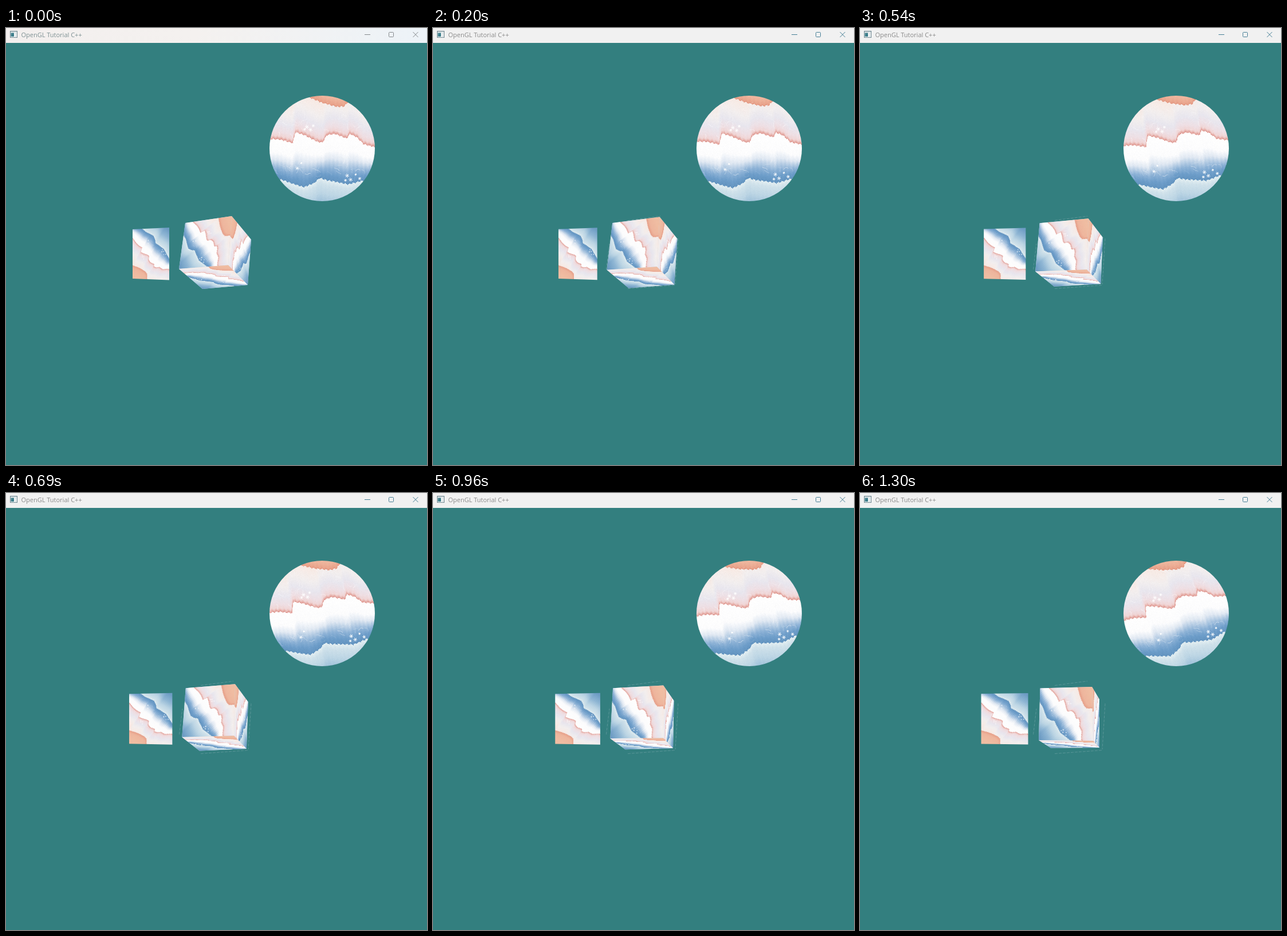
Recreate the animation shown at these times as an HTML page with a canvas. Size 735 by 762 pixels, loop 1360 ms.

```html
<!DOCTYPE html>
<html lang="en">
<head>
<meta charset="utf-8">
<title>OpenGL Tutorial C++</title>
<style>
  html, body { margin: 0; width: 100%; height: 100%; overflow: hidden; background: #337f7f; }
  #stage { position: relative; width: 735px; height: 762px; overflow: hidden; background: #337f7f; }
  svg { position: absolute; left: 0; top: 0; }
  .face { position: absolute; left: 0; top: 0; transform-origin: 0 0; }
  #disc { position: absolute; left: 460px; top: 118px; width: 184px; height: 184px; border-radius: 50%; overflow: hidden; }
  #disc canvas { position: absolute; left: -10.5px; top: -10.5px; width: 205px; height: 205px; }
  #bar { --ink: #467f96; --label: #8a8a8a; }
  #bar.start { --ink: #85898c; --label: #7d9093; }
  #bar text { font: 11px "Open Sans", "Noto Sans", sans-serif; fill: var(--label); }
  #buttons { fill: none; stroke: var(--ink); }
</style>
</head>
<body>
<div id="stage">
  <svg width="735" height="762">
    <defs>
      <linearGradient id="tint">
        <stop offset="0" stop-color="#f3efee"/>
        <stop offset=".45" stop-color="#f4f1ef"/>
        <stop offset="1" stop-color="#edf3f8"/>
      </linearGradient>
    </defs>
    <g id="bar">
      <rect id="barFill" width="735" height="26" fill="#f1f1f1"/>
      <rect x="7.5" y="5.5" width="12" height="11" fill="#f8fafa" stroke="#6f8790"/>
      <path d="M8 7h11" stroke="#a9b9bf"/>
      <rect x="8.5" y="8.5" width="5.500" height="6.500" fill="#3f7f8c"/>
      <path d="M15.500 9.500h3M15.500 12h3M15.500 14.500h3" stroke="#c3ced2"/>
      <text x="26.500" y="15.500">OpenGL Tutorial C++</text>
      <g id="buttons">
        <path d="M626 11.500h10"/>
        <rect x="668.500" y="7.500" width="8" height="8" rx="1"/>
        <path d="M710.500 7l9 9M719.500 7l-9 9"/>
      </g>
    </g>
    <path id="trail" d="M340 335.500L397 328M302.500 421L308 376M428 367L423 447M340 454.500L423 448.500"
          fill="none" stroke="#8fb3b8" stroke-opacity=".5" stroke-width=".8" stroke-dasharray="5 2"/>
    <polygon id="hull" fill="#c9d5e0"/>
  </svg>
  <div id="disc"></div>
</div>
<script>
const $ = id => document.getElementById(id);
const SIDE = 410, SPAN = 205, TILT = 50 * Math.PI / 180;
const LOOP = 1360, LAST = 1300, SPIN = 0.315;
const STARTS = [0, 70, 140, 200, 270, 340, 410, 470, 540, 620,
  690, 760, 830, 890, 960, 1030, 1100, 1160, 1230, 1300];

// Strata boundaries, in units around the texture centre
const RUST = [[-145, -160], [-60, -108], [-22, -89], [0, -80], [25, -73], [38, -74], [46, -83], [55, -95], [70, -150], [145, -170]];
const CREST = [[-145, -18], [-121, -14], [-92, -17], [-74, -16], [-52, -10], [-47, -29], [-32, -24], [-8, -12], [0, -11],
  [8, -24], [22, -26], [42, -18], [48, -26], [60, -20], [72, -8], [91, -3], [113, 18], [145, 30]];
const SHORE = [[-145, 30], [-97, 50], [-77, 52], [-52, 61], [-32, 67], [-15, 60], [-5, 51], [8, 55], [45, 62], [70, 56], [92, 51], [145, 60]];

const ramp = stops => stops.map(([at, hex]) =>
  [at, ...[16, 8, 0].map(s => parseInt(hex, 16) >> s & 255)]);
const RUST_RAMP = ramp([[0, 'e2957f'], [3, 'e9a48c'], [12, 'eeb59d'], [40, 'f0bda2']]);
const SKY_RAMP = ramp([[0, 'dd938c'], [2, 'e5aaa3'], [6, 'f0d5d5'], [14, 'eedfe4'], [28, 'e8e6ee'],
  [45, 'f2eeee'], [65, 'f7ebe6'], [90, 'f7e4dc']]);
const SNOW_RAMP = ramp([[0, 'ffffff'], [.35, 'fcfcfd'], [.52, 'e0e8f2'], [.74, '8db2d6'], [.88, '6d9dc9'], [1, '6293bf']]);
const SEA_RAMP = ramp([[0, 'e4eff2'], [8, 'cfe1ea'], [25, 'bcd5e4'], [50, '8fb6d4'], [80, '6d9cc4']]);

const mix = (a, b, k) => a + (b - a) * k;

// Piecewise linear lookup; returns every column after the first
function sample(rows, x) {
  let i = 1;
  while (i < rows.length - 1 && rows[i][0] < x) i++;
  const a = rows[i - 1], b = rows[i];
  const k = Math.min(1, Math.max(0, (x - a[0]) / (b[0] - a[0])));
  return a.slice(1).map((v, j) => mix(v, b[j + 1], k));
}

function shade(x, y) {
  const rough = 0.9 * Math.sin(x * 0.9) + 0.6 * Math.sin(x * 2.3 + 1);
  const rust = sample(RUST, x)[0] + rough;
  const crest = sample(CREST, x)[0] + rough;
  const shore = sample(SHORE, x)[0] + rough;
  if (y < rust) return sample(RUST_RAMP, rust - y);
  if (y < crest) return sample(SKY_RAMP, crest - y);
  if (y < shore) return sample(SNOW_RAMP, (y - crest) / (shore - crest));
  return sample(SEA_RAMP, y - shore);
}

function randomizer(seed) {
  return () => (seed = (seed * 16807) % 2147483647) / 2147483647;
}

function makeCanvas(size) {
  const c = document.createElement('canvas');
  c.width = c.height = size;
  return c;
}

function paintTexture() {
  const tex = makeCanvas(SIDE), g = tex.getContext('2d');
  const img = g.createImageData(SIDE, SIDE);
  const rnd = randomizer(71), cos = Math.cos(TILT), sin = Math.sin(TILT), unit = SPAN / SIDE;
  for (let j = 0, n = 0; j < SIDE; j++) {
    for (let i = 0; i < SIDE; i++) {
      const x = (i + 0.5) * unit - SPAN / 2, y = (j + 0.5) * unit - SPAN / 2;
      const grain = (rnd() - 0.5) * 8;
      for (const v of shade(x * cos + y * sin, y * cos - x * sin)) img.data[n++] = v + grain;
      img.data[n++] = 255;
    }
  }
  g.putImageData(img, 0, 0);

  g.translate(SIDE / 2, SIDE / 2);
  g.scale(1 / unit, 1 / unit);
  g.rotate(TILT);
  g.strokeStyle = '#fff';
  g.lineCap = 'round';
  // Fine white veins
  for (let i = 0; i < 210; i++) {
    let x = mix(-120, 120, rnd()), y = mix(-78, 48, rnd()), dir = rnd() * 6.28;
    g.globalAlpha = mix(0.12, 0.5, rnd());
    g.lineWidth = mix(0.4, 0.9, rnd());
    g.beginPath();
    g.moveTo(x, y);
    for (let k = 0; k < 4; k++) {
      dir += rnd() * 1.6 - 0.8;
      g.lineTo(x += 2.5 * Math.cos(dir), y += 2.5 * Math.sin(dir));
    }
    g.stroke();
  }
  // Sparkles
  g.globalAlpha = 0.9;
  g.lineWidth = 1;
  const stars = [[43, 47, 3], [49, 54, 3], [40, 55, 2], [65, 52, 2.5], [58, 45, 1.5], [-44, 34, 2.5],
    [-37, 25, 1.5], [-27, -38, 3], [-21, -33, 3], [-31, -34, 2], [-16, -40, 2]];
  for (const [x, y, r] of stars) {
    g.beginPath();
    for (let a = 0; a < 3; a++) {
      const dx = r * Math.cos(a * 1.05 + 0.3), dy = r * Math.sin(a * 1.05 + 0.3);
      g.moveTo(x - dx, y - dy);
      g.lineTo(x + dx, y + dy);
    }
    g.stroke();
  }
  return tex;
}

// Vertex paths: start x, y, end x, y
const CUBE = {
  tl: [313, 340, 314.5, 340.5], tr: [394, 328, 405, 338], right: [428, 369, 418, 360],
  br: [422, 448, 418, 444], low: [343, 455, 333, 444.5], bl: [302, 420, 312, 431], mid: [388, 413.5, 407, 432]
};
const PANEL = {
  ptl: [221, 351, 211.5, 350], ptr: [285, 348, 293.5, 349],
  pbr: [285, 439.5, 293.5, 438.5], pbl: [221, 437, 211.5, 437.5]
};
// Vertices in texture order: top left, top right, bottom right, bottom left
const FACES = [
  ['tl', 'tr', 'mid', 'bl'],
  ['right', 'tr', 'mid', 'br'],
  ['br', 'mid', 'bl', 'low'],
  ['ptl', 'pbl', 'pbr', 'ptr']
];
const OUTLINE = ['tl', 'tr', 'right', 'br', 'low', 'bl'];
const FACE_SIZE = 128;

const place = (path, k) => [mix(path[0], path[2], k), mix(path[1], path[3], k)];

// Perspective map from a square of the given size to four corners
function project([[x0, y0], [x1, y1], [x2, y2], [x3, y3]], n) {
  const sx = x0 - x1 + x2 - x3, sy = y0 - y1 + y2 - y3;
  const ax = x1 - x2, ay = y1 - y2, bx = x3 - x2, by = y3 - y2;
  const det = ax * by - bx * ay;
  const g = (sx * by - bx * sy) / det, h = (ax * sy - sx * ay) / det;
  const m = [
    (x1 - x0 + g * x1) / n, (y1 - y0 + g * y1) / n, 0, g / n,
    (x3 - x0 + h * x3) / n, (y3 - y0 + h * y3) / n, 0, h / n,
    0, 0, 1, 0, x0, y0, 0, 1];
  return `matrix3d(${m.map(v => v.toFixed(9)).join()})`;
}

const texture = paintTexture();
$('disc').append(texture);
const faces = FACES.map(names => {
  const el = makeCanvas(FACE_SIZE), g = el.getContext('2d');
  g.imageSmoothingQuality = 'high';
  g.drawImage(texture, 0, 0, FACE_SIZE, FACE_SIZE);
  el.className = 'face';
  $('stage').append(el);
  return { el, names };
});

let shown = -1;
function draw(t) {
  const k = t / LAST, eased = k + 0.4 * k * (1 - k), at = {};
  for (const v in CUBE) at[v] = place(CUBE[v], k);
  for (const v in PANEL) at[v] = place(PANEL[v], eased);
  for (const { el, names } of faces) el.style.transform = project(names.map(v => at[v]), FACE_SIZE);
  $('hull').setAttribute('points', OUTLINE.map(v => at[v].join()).join(' '));
  texture.style.transform = `rotate(${-TILT - SPIN * k}rad)`;
  $('trail').style.visibility = t >= 140 ? 'visible' : 'hidden';
  $('bar').classList.toggle('start', t === 0);
  $('barFill').setAttribute('fill', t === 0 ? 'url(#tint)' : '#f1f1f1');
}

function tick() {
  const now = performance.now() % LOOP;
  const t = STARTS.findLast(s => s <= now);
  if (t !== shown) draw(shown = t);
  requestAnimationFrame(tick);
}
tick();
</script>
</body>
</html>
```
